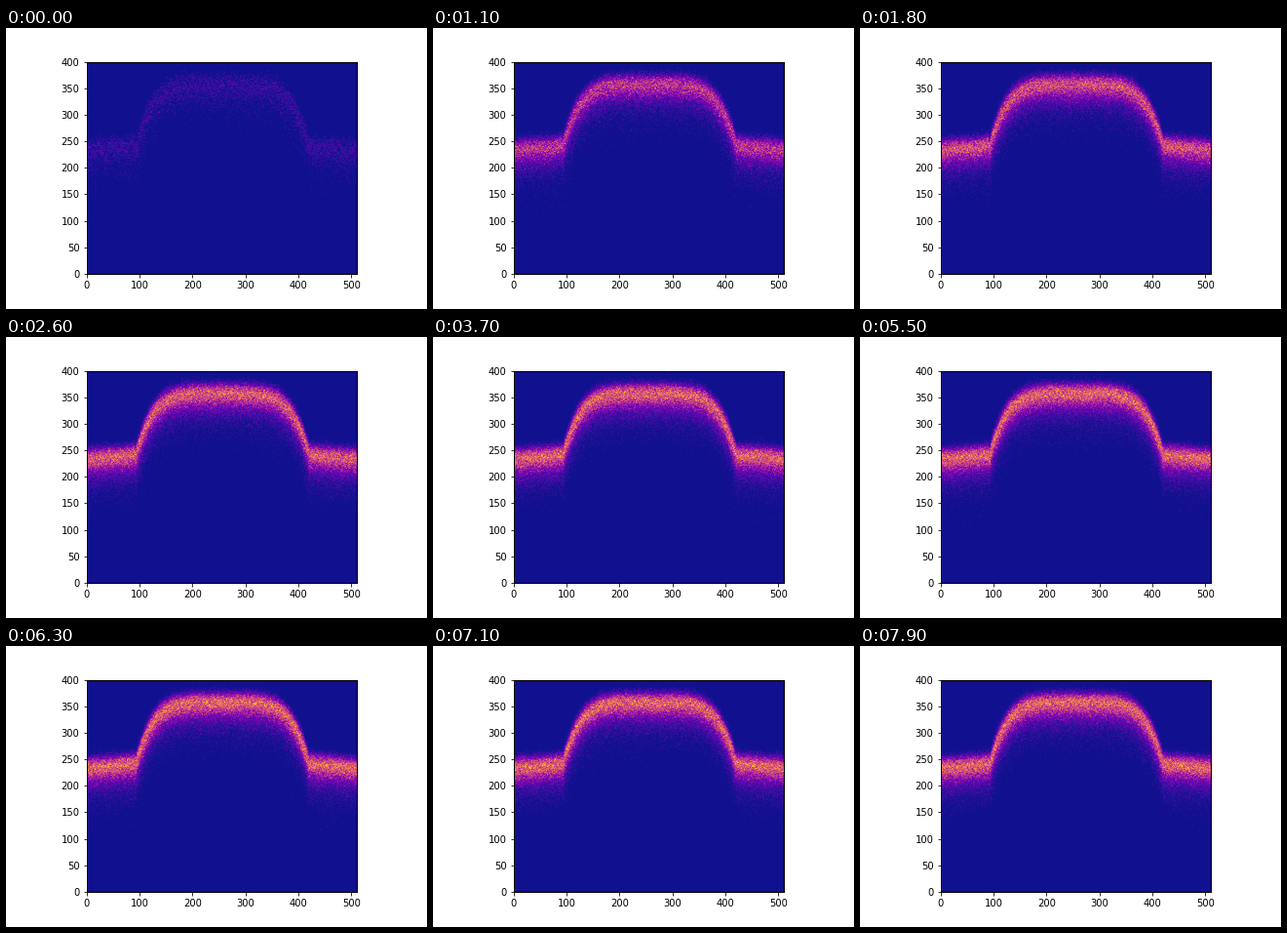
A matplotlib script for the animation above (8000 ms loop, 432x288 px).

```python
import numpy as np
import matplotlib.pyplot as plt
from matplotlib.animation import FuncAnimation
from matplotlib.colors import ListedColormap

FRAMES, INTERVAL = 80, 100
BINS, LEVELS = 511, 400
SWEEPS, DECAY = 12, 0.9   # spectra added per frame, persistence of the display
SPREAD = 15               # levels per e-fold of power
EDGE = 163                # half width of the pass band

plt.rcParams.update({"font.family": "DejaVu Sans", "font.size": 10,
                     "axes.linewidth": 1})


def band_level():
    """Mean level per bin: a domed pass band above a sloping noise floor."""
    d = np.abs(np.arange(BINS) - BINS / 2)
    dome = 356 - 114 * (d / EDGE) ** 5
    floor = 241 - 0.09 * (d - EDGE)
    return np.where(d < EDGE, np.maximum(dome, floor), floor)


def noise_power(rng):
    """Power of Hann-windowed noise, so that neighbouring bins correlate."""
    real, imag = rng.normal(size=(2, SWEEPS, BINS))
    z = real + 1j * imag
    z = z - 0.5 * (np.roll(z, 1, axis=1) + np.roll(z, -1, axis=1))
    return np.abs(z) ** 2 / 3


def persistence():
    """Fading histogram of noisy spectra, one picture per frame."""
    rng = np.random.default_rng(7)
    level = band_level()
    hist = np.zeros((LEVELS, BINS), np.float32)
    pictures = []
    for _ in range(FRAMES):
        rows = level + SPREAD * np.log(noise_power(rng))
        rows = np.clip(rows, 0, LEVELS - 1).astype(int)
        hist *= DECAY
        np.add.at(hist, (rows, np.arange(BINS)[None, :]), 1)
        pictures.append(hist.copy())
    return pictures


def heat_map():
    """Plasma with a slightly lifted dark end."""
    t = np.linspace(0, 1, 256)
    rgb = plt.get_cmap("plasma")(t)[:, :3]
    lift = np.array([5, 10, 9]) / 255
    return ListedColormap(np.clip(rgb + lift * (1 - t[:, None]), 0, 1))


pictures = persistence()

fig, ax = plt.subplots(figsize=(6, 4), dpi=72, facecolor="white")
fig.subplots_adjust(left=0.125, right=0.9, bottom=0.125, top=0.88)
image = ax.imshow(pictures[0], cmap=heat_map(), vmin=0, vmax=5,
                  origin="lower", extent=(0, BINS, 0, LEVELS),
                  interpolation="antialiased")
ax.set_xticks(range(0, 501, 100))
ax.set_yticks(range(0, 401, 50))


def update(i):
    image.set_data(pictures[i])
    return [image]


anim = FuncAnimation(fig, update, frames=FRAMES, interval=INTERVAL,
                     repeat=True, repeat_delay=0, blit=False)
plt.show()
```
